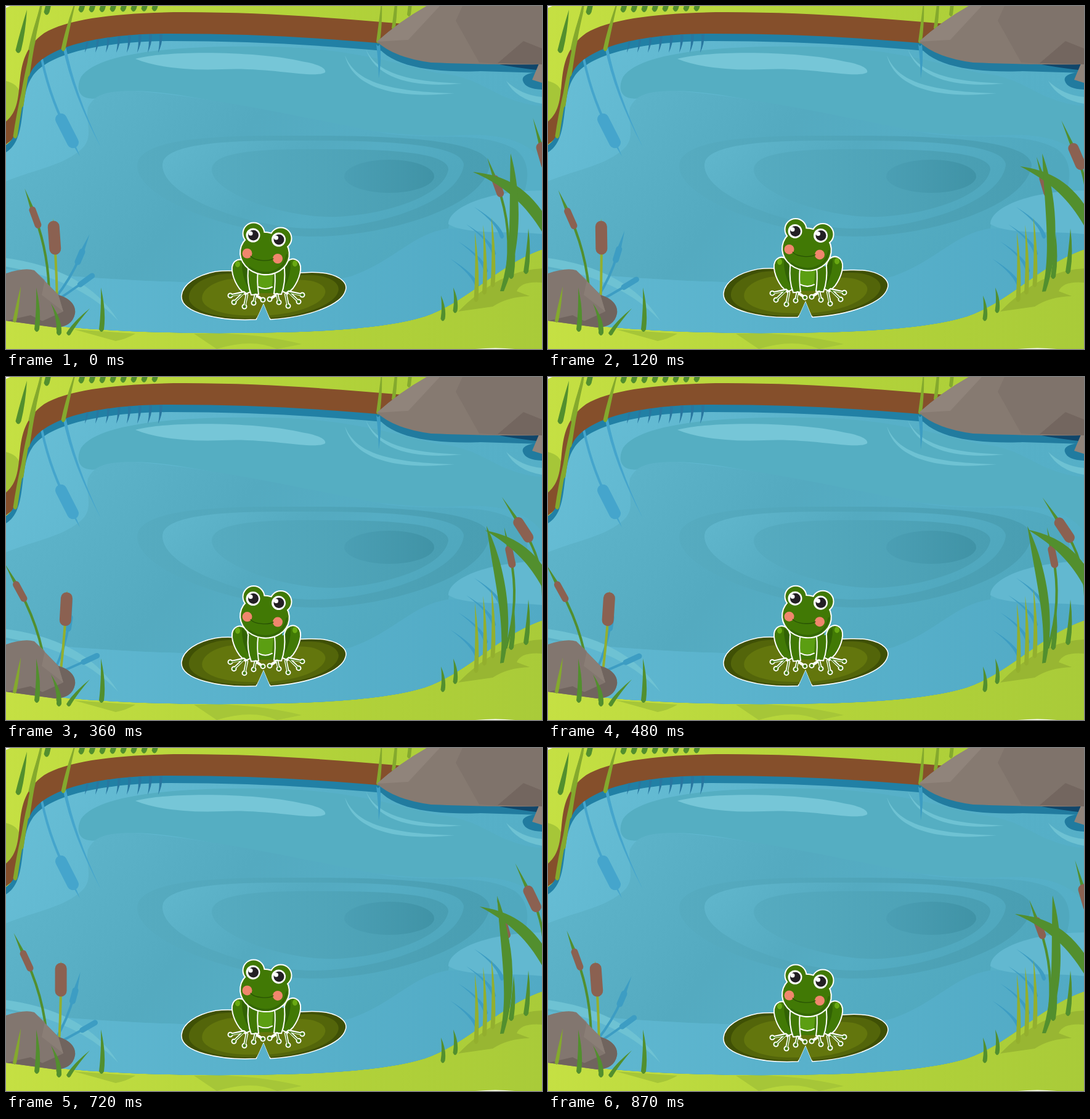
Write an HTML page that moves like this. It is 870 by 558 pixels and loops after 900 ms.

```html
<!DOCTYPE html>
<html lang="en">
<meta charset="utf-8">
<title>Frog pond</title>
<style>
html, body { margin: 0; width: 100%; height: 100%; overflow: hidden; background: #b5d53b }
svg { display: block; width: 870px; height: 558px }
.line { fill: none; stroke-linecap: round; stroke-linejoin: round }
.skin { fill: #417905 }
.rim { stroke: #fff; stroke-width: 4 }
.edge { stroke: #fff; stroke-width: 2 }
</style>
<svg viewBox="0 0 870 558">
<defs>
  <linearGradient id="grass"><stop stop-color="#c5e043"/><stop offset=".5" stop-color="#b4d43a"/><stop offset="1" stop-color="#a9cb39"/></linearGradient>
  <linearGradient id="light" x2="1" y2=".35"><stop stop-color="#69bfd7"/><stop offset=".55" stop-color="#57b0c8"/><stop offset="1" stop-color="#55afc7"/></linearGradient>
  <linearGradient id="deep" x2="1" y2=".3"><stop stop-color="#61b7cd"/><stop offset=".48" stop-color="#54aac0"/><stop offset=".68" stop-color="#55adc4"/><stop offset="1" stop-color="#50a8be"/></linearGradient>
  <linearGradient id="low"><stop stop-color="#60b8d1"/><stop offset="1" stop-color="#51aac5"/></linearGradient>
  <linearGradient id="ring"><stop stop-color="#56abc0"/><stop offset="1" stop-color="#499eb2"/></linearGradient>
  <linearGradient id="core"><stop stop-color="#4b9fb4"/><stop offset="1" stop-color="#4093a6"/></linearGradient>
  <clipPath id="pond"><path d="M0 226C32 205 19 146 40 108C62 66 152 45 265 45C390 45 500 51 612 61L870 85V396C800 420 751 480 680 505C600 530 450 533 300 532C150 529 60 521 0 508Z"/></clipPath>
  <path id="pad" d="M285 471C287 452 310 438 340 432C370 428 395 434 420 437C450 438 490 430 520 435C545 440 555 452 551 463C545 485 495 506 429 510L418 483L406 510C350 513 282 500 285 471Z"/>
  <path id="tips" d="M364 471h0M370 482h0M387 489h0M402 483h0M417 478h0"/>
  <g id="skull"><circle cx="402" cy="370" r="16.5"/><circle cx="446" cy="378" r="16.5"/><ellipse cx="420" cy="402.5" rx="39" ry="33.5" transform="rotate(8 420 402)"/></g>
</defs>

<!-- banks -->
<path fill="url(#grass)" d="M0 0H870V558H0Z"/>
<path fill="#fff" d="M0 0H7L0 3ZM762 558Q795 555 826 558Z"/>
<path fill="#a6c638" d="M0 122Q18 126 22 140V165L0 190ZM305 533Q400 530 480 550L440 558Q400 540 342 558ZM110 526L210 533Q195 542 178 545Z"/>
<path fill="#98b632" d="M734 497Q800 430 870 427V450Q836 447 829 464L850 472Q814 473 790 489Z"/>
<path fill="#854f2b" d="M0 188C40 155 0 88 62 44C100 20 190 10 290 10C420 10 540 20 645 29L612 62C480 50 350 46 260 47C150 49 70 66 46 104C28 136 34 185 22 208L0 225Z"/>

<!-- water -->
<g clip-path="url(#pond)">
  <path fill="#2180a5" d="M0 0H870V558H0Z"/>
  <path fill="url(#light)" d="M0 238C36 217 19 150 42 116C66 78 152 58 265 57C390 57 500 63 612 73L870 107V558H0Z"/>
  <path fill="#55aec2" d="M150 150C118 155 112 135 122 115C150 75 280 64 420 66C560 68 625 92 700 109C780 116 790 155 870 163V252C845 215 790 207 740 210C550 220 350 142 210 138C175 138 165 146 150 150Z"/>
  <path fill="url(#deep)" d="M0 285C50 265 90 260 120 235C145 215 128 190 133 165C145 142 165 138 210 138C350 150 500 185 620 208C700 218 770 203 825 232C848 248 850 275 842 300C790 308 722 330 718 362C660 372 630 415 560 440C480 460 150 450 0 428Z"/>
  <path fill="url(#low)" d="M0 428C150 450 480 460 560 440C630 415 660 370 718 362H870V558H0Z"/>
  <path fill="#62b8d0" d="M718 355C718 328 780 301 870 300V371C810 365 750 373 718 355Z"/>
  <g id="rings"></g>
  <ellipse cx="622" cy="277" rx="73" ry="27" fill="url(#core)"/>
  <path fill="#76c6d7" d="M210 86C270 70 420 75 480 90C510 95 520 102 518 108C500 119 430 99 350 103Q260 106 210 86Z"/>
  <path fill="#217b9f" d="M598 58C618 97 685 109 770 106L870 109V80ZM870 107Q835 109 839 122T870 136Z"/>
  <path fill="#10466a" d="M790 93L870 95V105Q830 101 790 93Z"/>
  <path fill="#6ec2d3" d="M550 80C566 120 610 139 728 142C650 150 565 141 550 80ZM584 70C602 109 650 123 740 126C660 134 600 118 584 70ZM812 122Q836 145 870 148V159Q828 152 812 122ZM0 410Q130 428 182 512Q120 445 0 424Z"/>
  <g id="mirror"></g>
</g>
<g id="back"></g>

<!-- rocks and reeds -->
<path fill="#867a71" d="M602 58Q640 24 683 0H870V95C820 96 740 94 690 92Q630 84 602 58Z"/>
<path fill="#90847b" d="M602 58Q640 24 683 0H704L653 55ZM870 82L854 120L870 125Z"/>
<path fill="#7f736b" d="M741 0L730 24L768 92L800 94L840 57L870 69V0Z"/>
<path fill="#73665f" d="M840 57L870 69V95L798 93Z"/>
<g id="left"></g>
<path fill="#82766f" d="M0 435Q30 425 46 430L85 470C100 474 114 485 112 500Q108 522 80 523L0 512Z"/>
<path fill="#70645e" d="M85 470C102 475 114 485 112 500Q108 522 80 523L58 513L93 497ZM0 512L40 503L80 523Z"/>
<path fill="#8a7e76" d="M46 430L63 446L58 470L93 497L85 470Z"/>
<g id="right"></g>
<g fill="#528f2e">
  <path data-sway="6.5 960 440" d="M758 270C795 274 845 283 885 358L900 420C860 345 835 305 758 270Z"/>
  <path data-sway="-10.5 812 465" d="M819 240C836 300 840 390 808 464H802C822 400 816 340 819 240Z"/>
</g>
<g id="front"></g>

<!-- frog on its lily pad -->
<g data-lift="7.6">
  <use href="#pad" fill="#3f5005" stroke="#fff" stroke-width="1.5"/>
  <use href="#pad" fill="#53650a" transform="translate(418 483) scale(.91) translate(-418 -483)"/>
  <use href="#pad" fill="#63760d" transform="translate(418 483) scale(.75) translate(-418 -483)"/>
  <path class="skin" d="M393 421L397 467H443L449 421Z"/>
  <path fill="#5b9e12" d="M409 430H434L432 456Q421 463 410 456Z"/>
  <path class="line edge" d="M410 457Q421 463 432 457"/>
  <g id="leg">
    <path class="skin edge" d="M371 416C362 425 369 446 379 460L388 469L399 464C391 446 398 426 388 416Q379 409 371 416Z"/>
    <path fill="#316204" d="M383 416Q396 424 390 443L394 460Q382 440 383 416Z"/>
    <ellipse cx="376" cy="420" rx="4" ry="5" fill="#69a912"/>
    <path class="skin edge" d="M393 428Q391 451 398 470L410 469Q407 448 409 431"/>
    <g class="line">
      <path stroke="#fff" stroke-width="4.5" d="M364 471L386 466L370 482M387 489L391 470L386 466M402 483L405 470L417 478"/>
      <use href="#tips" stroke="#fff" stroke-width="9"/>
      <use href="#tips" stroke="#417905" stroke-width="5"/>
      <path stroke="#417905" stroke-width="1.5" d="M366 471L386 467L372 480M388 486L391 470M403 480L405 471"/>
    </g>
  </g>
  <use href="#leg" transform="matrix(-1 0 0 1 845 -1)"/>
</g>
<g data-lift="12.9">
  <use href="#skull" class="skin rim"/>
  <use href="#skull" class="skin"/>
  <path class="line" stroke="#346704" stroke-width="3" d="M456 405Q450 433 421 434Q405 433 395 425"/>
  <g id="eye"><circle cx="401" cy="373" r="11.5" fill="#fff"/><circle cx="401.500" cy="373" r="8.500" fill="#231f24"/><circle cx="397" cy="370" r="3.500" fill="#fff"/></g>
  <use href="#eye" x="41.500" y="7"/>
  <g fill="#f0866d"><circle cx="391.5" cy="402.5" r="8"/><circle cx="441" cy="411" r="8"/></g>
  <path class="line" stroke="#285204" stroke-width="1.3" d="M397 407C404 415 426 416 434 411"/>
</g>
</svg>
<script>
const green = '#528f2e', olive = '#93af2e', lime = '#84a92d', brown = '#8b6151';
const blue = '#3d9dc3', paleBlue = '#45a5cc', deepBlue = '#2877a0';
const add = (id, markup) => document.getElementById(id).innerHTML += markup;

// A row of tapering blades: first base, step between bases, then tip offset and width.
function tuft(id, color, count, x, y, stepX, stepY, lean, rise, width) {
  let d = '';
  for (let i = 0; i < count; i++) {
    const bx = x + i * stepX, by = y + i * stepY, w = width / 2;
    const mid = bx + lean * .2 + w, half = by - rise * .45;
    d += `M${bx - w} ${by}Q${mid - w} ${half} ${bx + lean} ${by - rise}Q${mid + w} ${half} ${bx + w} ${by}Q${bx} ${by + width} ${bx - w} ${by}`;
  }
  add(id, `<path fill="${color}" d="${d}"/>`);
}

// A cattail head with a spike along its axis and a stem bending down to the foot it sways about.
function cattail(id, headColor, stemColor, x, y, tilt, length, width, spike, footX, footY, sway) {
  const a = tilt * Math.PI / 180, ux = Math.sin(a), uy = -Math.cos(a);
  const along = (s, side = 0) => `${x + ux * s - uy * side} ${y + uy * s + ux * side}`;
  const bend = Math.hypot(footX - x, footY - y) / 2;
  add(id, `<g class="line" data-sway="${sway} ${footX} ${footY}">
    <path stroke="${stemColor}" stroke-width="4" d="M${along(0)}Q${along(-bend)} ${footX} ${footY}"/>
    <path fill="${stemColor}" d="M${along(0, -4)}L${along(spike)}L${along(0, 4)}"/>
    <path stroke="${headColor}" stroke-width="${width}" d="M${along(length / 2)}L${along(-length / 2)}"/></g>`);
}

// A flat-topped pool of depth.
function ring(fill, left, right, top, bottom, waist) {
  const w = right - left, h = bottom - top, low = left + w * .5;
  add('rings', `<path fill="url(#${fill})" d="M${left} ${waist}C${left} ${top + h * .04} ${left + w * .2} ${top} ${left + w * .4} ${top}
    S${right} ${top - h * .02} ${right} ${waist}C${right - w * .02} ${bottom - h * .28} ${low + w * .2} ${bottom} ${low} ${bottom}
    S${left} ${bottom - h * .35} ${left} ${waist}Z"/>`);
}

ring('ring', 213, 785, 211, 375, 260);
ring('deep', 254, 743, 219, 362, 259);
ring('ring', 334, 718, 233, 343, 266);

cattail('mirror', paleBlue, paleBlue, 99, 203, 153, 42, 19, 47, 55, 70, 0);
tuft('mirror', paleBlue, 1, 95, 68, 0, 0, 59, -162, 5);
tuft('mirror', deepBlue, 8, 132, 44, 17, 0, -4, -32, 5);
tuft('mirror', blue, 1, 604, 62, 0, 0, 1, -56, 6);
tuft('mirror', blue, 4, 805, 375, -13, 28, -45, 48, 7);

tuft('back', green, 2, 20, 72, 46, -62, 14, 66, 9);
tuft('back', green, 8, 122, 6, 17, -.3, 6, 40, 9);
tuft('back', lime, 3, 15, 212, 10, -50, 34, 160, 7);
tuft('back', lime, 2, 40, 70, 53, 0, 22, 85, 7);
tuft('back', lime, 3, 604, 58, 25, -22, 6, 70, 6);

cattail('left', blue, blue, 120, 408, 23, 18, 10, 40, 80, 475, -15);
cattail('left', blue, blue, 130, 446, 54, 24, 9, 10, 68, 488, 11.5);
cattail('left', brown, green, 47.5, 344, -20, 26, 11, 50, 68, 512, -9);
cattail('left', brown, olive, 78.5, 377, -4, 36, 19, 31, 83, 525, 7.7);
cattail('right', brown, green, 873, 244, -16, 29, 17, 64, 872, 357, -18);
cattail('right', brown, green, 798, 293, -20, 25, 12, 49, 812, 440, 8.5);

tuft('front', olive, 3, 763, 478, 13.5, -12, -2, 110, 7);
tuft('front', green, 2, 820, 440, 24, -8, 4, 70, 8);
tuft('front', green, 2, 709, 509, 20, -13, -3, 38, 7);
tuft('front', green, 2, 50, 526, 105, 0, -1, 68, 8);
tuft('front', green, 1, 86, 532, 0, 0, -13, 48, 8);
tuft('front', green, 1, 102, 532, 0, 0, 34, 40, 8);
tuft('front', lime, 1, 14, 512, 0, 0, 10, 56, 6);

const swaying = [...document.querySelectorAll('[data-sway]')].map(el => [el, ...el.dataset.sway.split(' ').map(Number)]);
const lifted = [...document.querySelectorAll('[data-lift]')];

function draw(now) {
  const t = Math.floor(now % 900 / 30) * 30;
  const phase = t < 450 ? t / 900 : .5 + (t - 450) / 840;
  const swing = Math.max(0, Math.sin(Math.PI * phase)), rise = swing ** .75;
  for (const [el, angle, x, y] of swaying) el.setAttribute('transform', `rotate(${angle * swing} ${x} ${y})`);
  for (const el of lifted) el.setAttribute('transform', `translate(0 ${-el.dataset.lift * rise})`);
  requestAnimationFrame(draw);
}
draw(performance.now());
</script>
</html>
```
